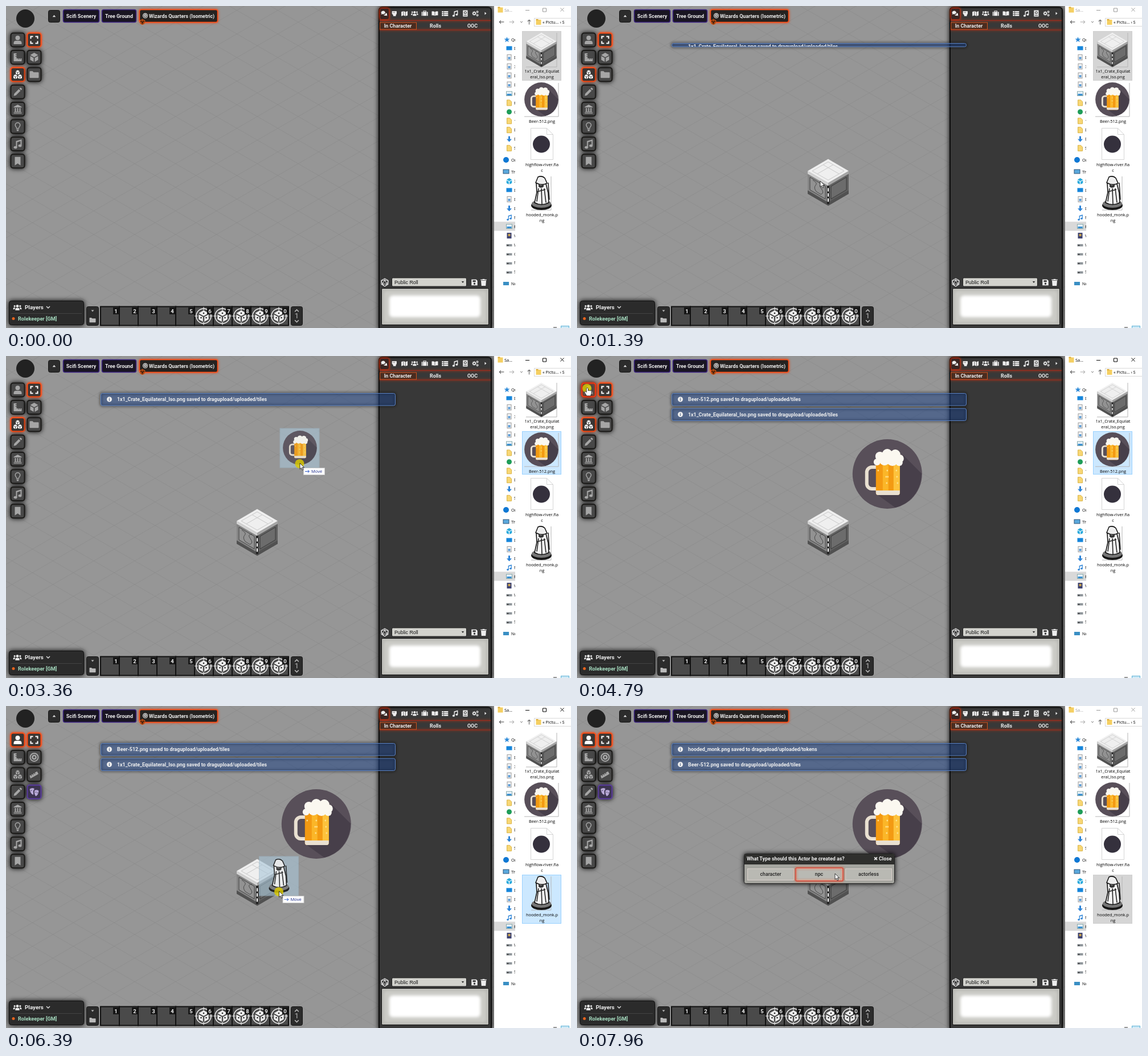
An HTML page that plays this animation: 992x565 px, repeating every 8000 ms.

```html
<!DOCTYPE html>
<html lang="en">
<head>
<meta charset="utf-8">
<title>Drag and drop upload</title>
<style>
  html, body { margin: 0; width: 100%; height: 100%; overflow: hidden; background: #969696; }
  svg { display: block; }
  text { font: 700 8.85px Roboto, sans-serif; fill: #eee; }
  .win text { font: 7.4px "Open Sans", sans-serif; fill: #000; }
  .shade { filter: drop-shadow(0 0 4px #000); }
  .glow { filter: drop-shadow(0 0 2px #ff3a00); }
  .mid { text-anchor: middle; }
</style>
</head>
<body>
<svg id="stage" width="992" height="565"></svg>
<script>
const disc = (r, x = 0, y = 0) =>
  `M${x - r} ${y}a${r} ${r} 0 1 0 ${2 * r} 0a${r} ${r} 0 1 0 ${-2 * r} 0z`;
const box = (x, y, w, h) => `M${x} ${y}h${w}v${h}h${-w}z`;
const cube = (x, y, r) => {
  const w = r * .87, s = r * .75, q = r * .43;
  return `M${x} ${y - r}l${w} ${r / 2}l${-w} ${r / 2}l${-w} ${-r / 2}z` +
    `M${x - w} ${y - r * .28}l${s} ${q}v${r * .85}l${-s} ${-q}z` +
    `M${x + w} ${y - r * .28}l${-s} ${q}v${r * .85}l${s} ${-q}z`;
};
const gear = (x, y, r) => {
  let d = '';
  for (let i = 0; i < 32; i++) {
    const k = i % 4 < 2 ? r : r * .72, a = i * Math.PI / 16;
    d += `${i ? 'L' : 'M'}${x + k * Math.cos(a)} ${y + k * Math.sin(a)}`;
  }
  return d + 'z' + disc(r * .35, x, y);
};

// Icon outlines in a 16 unit box centred on 0,0
const icons = {
  user: disc(4, 0, -3.5) + 'M-7 7.5v-2q0-4 4-4h6q4 0 4 4v2z',
  corner: 'M-7-7h5v2h-2v1h2v2h-2v1h2v3h3v2h1v-2h2v2h1v-2h2v5h-14z',
  cubes: cube(0, -3.8, 4) + cube(-4, 3.6, 4) + cube(4, 3.6, 4),
  cube: cube(0, 0, 8),
  pencil: 'M-7 7l1-4l8-8l3 3l-8 8zM3-6l1-1q1-1 2 0l1 1q1 1 0 2l-1 1z',
  bank: 'M0-8l7 4v1h-14v-1z' + [-5, -1, 3].map(x => box(x, -2, 2, 6)).join('') + box(-6, 4, 12, 1) + box(-7, 6, 14, 1.5),
  bulb: 'M0-7.5a5 5 0 0 1 5 5q0 2-2 4l-.6 2.5h-4.8l-.6-2.5q-2-2-2-4a5 5 0 0 1 5-5zM0-6a3.5 3.5 0 0 0-3.5 3.5q0 1.5 1.5 3l.5 2h3l.5-2q1.5-1.5 1.5-3a3.5 3.5 0 0 0-3.5-3.5zM-2 5h4v1l-1 2h-2l-1-2z',
  music: 'M-3-5l10-3v11a3 2.3 0 1 1-2-2v-6l-6 2v9a3 2.3 0 1 1-2-2z',
  mark: 'M-5-7.5h10v15l-5-3.5l-5 3.5z',
  expand: 'M-7-7h5v2h-3v3h-2zM7-7v5h-2v-3h-3v-2zM-7 7v-5h2v3h3v2zM7 7h-5v-2h3v-3h2z',
  folder: 'M-8-5q0-1 1-1h4l2 2h8q1 0 1 1v8q0 1-1 1h-14q-1 0-1-1z',
  target: disc(8) + disc(6) + disc(4.4) + disc(1.8),
  ruler: 'M-8 2l2-1l1 2l1-.6l-1-2l2-1.2l1 2l1-.6l-1-2l2-1.2l1 2l1-.6l-1-2l4-2.3l2.5 4.5l-14 8z',
  masks: 'M-8-5q4-3 8-1v2q-2 1-1.5 5q.5 3 0 4q-5-1-6.5-10zM.5-2.5q4-2 7.5.5q-.5 7-5 9.5q-3.5-3-2.5-10z' + box(-6, -3, 2, 1) + box(2, 0, 1.6, 1) + box(5, 1, 1.6, 1),
  chat: 'M-2.5-6.5a5.5 4.2 0 1 1-2 8.2l-3.5 1.3l1.2-2.7a5.5 4.2 0 0 1 4.3-6.8zM4-1.5a5 4 0 0 1 3 5.5l1 2.5l-3-1a6 4 0 0 1-7-1.8q6 .3 6-5.2z',
  fist: 'M-5-6h10q1 0 1 1v6l-2 3v3h-7v-3l-3-3v-6q0-1 1-1zM-3-4v3h1v-3zM0-4v3h1v-3z',
  map: 'M-8-4l5-2v11l-5 2zM-2-6l4 2v11l-4-2zM3-4l5-2v11l-5 2z',
  users: disc(3, 0, -3) + disc(2, -6, -3) + disc(2, 6, -3) + 'M-4.5 6v-2q0-3 3-3h3q3 0 3 3v2zM-9 4v-2q0-2 2-2h1.5q1 0 1 .5q-1.500 1-1.500 3.500zM9 4v-2q0-2-2-2h-1.500q-1 0-1 .5q1.500 1 1.500 3.500z',
  bag: 'M-8-4h4v-3h8v3h4v10h-16zM-2.500-4h5v-1.500h-5z' + box(-5.5, -4, 1, 10) + box(4.5, -4, 1, 10),
  book: 'M-8-5q4-1 7.500 1v10q-4-2-7.500-1zM8-5q-4-1-7.500 1v10q4-2 7.500-1z',
  list: [-6, -1.5, 3].map(y => box(-8, y, 4, 3.4) + box(-3, y, 11, 3.4)).join(''),
  atlas: box(-6, -8, 12, 16) + disc(3.6, 0, -2) + disc(2, 0, -2) + box(-4, 4, 8, 1.5),
  cogs: gear(-3, 0, 5.5) + gear(5, -4, 3.2) + gear(5, 4.5, 3.2),
  save: 'M-7-7h11l3 3v11h-14zM-4-5v4h7v-4z' + disc(2.3, 0, 3),
  trash: 'M-7-7h4l1-1h4l1 1h4v2h-14zM-6-4h12l-1 12h-10z',
  up: 'M-5 3l5-6l5 6z', down: 'M-5-3l5 6l5-6z', right: 'M-3-5l6 5l-6 5z',
  angleUp: 'M-7 3l7-7l7 7l-2 2l-5-5l-5 5z', angleDown: 'M-7-3l7 7l7-7l-2-2l-5 5l-5-5z',
  info: disc(8) + box(-1.2, -1, 2.4, 5.5) + box(-1.2, -4.5, 2.4, 2.4),
  close: 'M-7-4l3-3l4 4l4-4l3 3l-4 4l4 4l-3 3l-4-4l-4 4l-3-3l4-4z',
  left: 'M-7 0l5-5l1 1l-3.300 3.300h11.300v1.400h-11.300l3.300 3.300l-1 1z',
  star: 'M0-8l2 5.500h6l-4.600 3.700l1.600 5.800l-5-3.300l-5 3.300l1.600-5.800l-4.600-3.700h6z'
};

const rect = (x, y, w, h, fill, stroke = 'none', more = '') =>
  `<rect x="${x}" y="${y}" width="${w}" height="${h}" fill="${fill}" stroke="${stroke}" ${more}/>`;
const text = (x, y, s, style = '', more = '') => `<text x="${x}" y="${y}" style="${style}" ${more}>${s}</text>`;
const path = (d, fill, stroke = 'none', more = '') => `<path d="${d}" fill="${fill}" stroke="${stroke}" ${more}/>`;
const circle = (x, y, r, fill, more = '') => `<circle cx="${x}" cy="${y}" r="${r}" fill="${fill}" ${more}/>`;
const icon = (name, x, y, size, fill, turn = 0) =>
  path(icons[name], fill, 'none', `fill-rule="evenodd" transform="translate(${x} ${y}) scale(${size / 16}) rotate(${turn})"`);
const group = (id, body, more = '') => `<g id="${id}" ${more}>${body}</g>`;
const use = (id, x, y, k = 1) => `<use href="#${id}" transform="translate(${x} ${y}) scale(${k})"/>`;

function defs() {
  const crate = path('M-36-20L0 1V41L-36 20z', '#848484') + path('M36-20L0 1V41L36 20z', '#606060') +
    path('M-32-9L-5 7V29L-32 13z', '#929292', '#444') + path('M32-9L5 7V29L32 13z', '#6c6c6c', '#3a3a3a') +
    path('M-27-4q9 5 5 9t1 11l8 5q7-2 1-10t3-8', 'none', '#4a4a4a') +
    path('M-36 14L0 35L36 14V20L0 41L-36 20z', '#515151') +
    path('M0-41L36-20L0 1L-36-20z', '#efefef') + path('M-36-20L0 1v5L-36-15z', '#d2d2d2') + path('M36-20L0 1v5L36-15z', '#a5a5a5') +
    path('M0-36L28-20L0-4L-28-20zM-9-31L19-15M9-31L-19-15', 'none', '#c9c9c9') +
    path('M0 6V38', 'none', '#222', 'stroke-width="4"') + path('M0 10V36', 'none', '#fff', 'stroke-width="2" stroke-dasharray="6 3"');
  const foam = [[-18, -21, 6], [-13, -31, 8], [0, -35, 9], [14, -34, 9], [22, -27, 7], [21, -20, 6], [-5, -24, 9], [9, -24, 10]];
  const beer = circle(0, 0, 61, '#584f59') +
    path('M28-33L60-1A61 61 0 0 1 14 59L-18 36z', '#473f4a') +
    rect(-36, -12, 26, 38, 'none', '#e9e0d1', 'rx="9" stroke-width="6"') +
    rect(-20, -24, 42, 61, '#f39a12', 'none', 'rx="4"') + rect(-8, -20, 10, 50, '#fbb628') + rect(11, -20, 11, 50, '#fdc23c') +
    [0, 1, 2, 3, 4, 5, 6, 7].map(i => circle(-16 + i * 17 % 35, -6 + i * 11 % 33, 1.4, '#fee08a')).join('') +
    path('M-20 29h42v4q0 4-4 4h-34q-4 0-4-4z', '#e9e0d1') +
    foam.map(c => circle(...c, '#fbf8f0')).join('');
  const monk = '<ellipse cy="22" rx="18" ry="8" fill="#161616"/><ellipse cy="19" rx="17" ry="7" fill="#777"/>' +
    path('M-9-17Q0-25 8-16L12 0L13 17Q0 24-12 17L-8-1z', '#f4f4f4', '#111', 'stroke-width="1.600"') +
    path('M-10-18L-6-28Q1-31 6-26L10-17Q0-12-10-18z', '#eee', '#111', 'stroke-width="1.500"') +
    path('M-5-16q5 5 9 0v5q-5 4-9 0z', '#333') +
    path('M-5-8L-8 15M0-8L1 20M5-8L8 17M-8-2L7-6M12-18L14 12', 'none', '#222', 'stroke-width="1.600"');
  const die = circle(0, 0, 13, 'none', 'stroke="#eee" stroke-width="1.500"') +
    path('M0-16v6M0 10v6M-16 0h6M10 0h6', 'none', '#eee') + icon('cube', 0, 0, 20, '#eee') +
    circle(0, -5, 1.3, '#222') + circle(-4.5, 3, 1.3, '#222') + circle(4.5, 3, 1.3, '#222');
  const d20 = path('M0-7L6-3.500V3.500L0 7L-6 3.500V-3.500zM0-4L4 3H-4zM0-7V-4M6-3.500L0-4L-6-3.500L-4 3L-6 3.500M6-3.500L4 3L6 3.500M-4 3L0 7L4 3', 'none', 'currentColor');
  return '<defs>' + Object.entries({ crate, beer, monk, die, d20 }).map(([id, body]) => group(id, body)).join('') + '</defs>';
}

function scene() {
  let grid = '';
  for (let y = -270; y < 1100; y += 41.4)
    grid += `M0 ${y - 246}l860 496M0 ${y + 263}l860 -496`;
  return rect(0, 0, 992, 565, '#969696') + path(grid, 'none', '#858585', 'stroke-opacity=".6" stroke-width=".8"') +
    group('crateTile', use('crate', 441, 309.5)) + group('beerTile', use('beer', 544.8, 207)) +
    path('M441 248L549 310L441 373L333 310z', 'none', '#ff9829', 'id="crateHover" stroke-width="2"') +
    path('M545 111L712 207L545 303L378 207z', 'none', '#ff9829', 'id="beerHover" stroke-width="2"');
}

function control(col, row, name, state) {
  const x = 20.5 + 29 * col, y = 59.5 + 30.4 * row;
  const [border, fill, ink] = { on: ['#ff4d14', '#3a3634', '#fff'], purple: ['#5a3ba0', '#3c3450', '#b9aad8'] }[state] || ['#1b1a18', '#484848', '#a6a6a6'];
  return `<g class="${state == 'on' ? 'glow' : 'shade'}">` + rect(x - 12, y - 12, 24, 24, fill, border, 'rx="4" stroke-width="2"') + '</g>' +
    icon(name, x, y, 16, ink);
}
const layer = (id, active, tools) => group(id,
  ['user', 'corner', 'cubes', 'pencil', 'bank', 'bulb', 'music', 'mark'].map((n, i) => control(0, i, n, n == active ? 'on' : '')).join('') +
  tools.map(([n, s], i) => control(1, i, n, s)).join(''));

function topBar() {
  const tab = (x, w, label, border) => rect(x, 6.5, w, 22, '#191522', border, 'rx="3" stroke-width="1.500"') + text(x + w / 2, 20.5, label, '', 'class="mid"');
  return circle(34, 22, 16, '#222') +
    rect(74.5, 7.5, 20, 21, '#2c2c2c', '#151515', 'rx="3"') + icon('up', 84.5, 17.5, 9, '#ddd') +
    tab(100.5, 63, 'Scifi Scenery', '#3c2482') + tab(168.500, 60, 'Tree Ground', '#3c2482') +
    `<g class="glow">${rect(234.500, 6.500, 137, 22, '#252220', '#ff4d14', 'rx="3" stroke-width="1.500"')}</g>` +
    icon('target', 244.500, 17, 9, '#eee') + text(251, 20.5, 'Wizards Quarters (Isometric)') +
    `<g color="#ff6a1a">${circle(239.500, 28, 4.500, '#2a1208') + use('d20', 239.500, 28, .7)}</g>`;
}

function bottomBar() {
  let s = `<g class="shade">${rect(5.500, 517.500, 131, 42, '#2b2b2b', '#111', 'rx="4"')}</g>` +
    icon('users', 20, 529, 13, '#eee') + text(33, 532, 'Players', 'font-size:9.800px') + icon('angleDown', 74, 529, 8, '#ddd') +
    path('M9 539.500h124', 'none', '#444') + circle(13, 548.500, 2.500, '#e8641e') + text(21, 551.500, 'Rolekeeper [GM]', 'fill:#a6dcc0;font-size:9.200px') +
    rect(141.500, 527.500, 21, 33, '#2c2c2c', '#151515', 'rx="3"') + icon('down', 152, 535, 8, '#bbb') + icon('folder', 152, 551, 11, '#bbb') +
    rect(500.500, 527.500, 20, 33, '#2c2c2c', '#151515', 'rx="3"') + icon('angleUp', 510.500, 534, 9, '#bbb') + icon('angleDown', 510.500, 553.500, 9, '#bbb') +
    text(510.500, 548, '1', 'font-size:13px;fill:#bbb;font-weight:400', 'class="mid"');
  for (let i = 0; i < 10; i++) {
    const x = 166 + 33 * i;
    s += rect(x, 527.500, 33, 33, '#4a4a4a', '#111', 'stroke-width="2"');
    if (i > 4) s += use('die', x + 16, 544);
    s += rect(x + 22, 529, 10, 12, '#171717') + text(x + 27, 538.800, (i + 1) % 10, 'font-size:9.500px', 'class="mid"');
  }
  return s;
}

function sidebar() {
  const names = ['chat', 'fist', 'map', 'users', 'bag', 'book', 'list', 'music', 'atlas', 'cogs', 'right'];
  return `<g class="shade">${rect(655, 2.500, 197, 566, '#383838', '#0d0d0d', 'rx="5" stroke-width="2"')}</g>` +
    `<g class="glow">${rect(656.500, 4, 16, 19.500, '#3a2522', '#a02818', 'rx="3"') + path('M656 25.500h195M656 42h195', 'none', '#a5281a')}</g>` +
    rect(656.500, 29, 64, 12, '#4a2c20', '#d0541e') +
    names.map((n, i) => icon(n, 664 + 17.800 * i, 13, i > 9 ? 8 : 11, '#eee')).join('') +
    text(688, 38, 'In Character', '', 'class="mid"') + text(754, 38, 'Rolls', '', 'class="mid"') + text(819, 38, 'OOC', '', 'class="mid"') +
    `<g color="#eee">${use('d20', 665, 485)}</g>` +
    rect(677.500, 477, 131, 15, '#d3d3ce', '#222', 'rx="2"') +
    text(682, 488, 'Public Roll', 'font:8.800px Liberation Sans,sans-serif;fill:#111') + icon('down', 802, 484.500, 7, '#111') +
    icon('save', 822.500, 485, 12, '#eee') + icon('trash', 838.500, 485, 12, '#eee') +
    rect(659.500, 495.500, 188, 64, '#bdbdb8', '#111', 'rx="2"') +
    rect(664, 500, 179, 55, '#cbcbc6', 'none', 'rx="6" style="filter:blur(2px)"') +
    rect(673, 508, 160, 38, '#fff', 'none', 'rx="6" style="filter:blur(2.500px)"');
}

function treeRow(kind, y, label) {
  const x = 883.500, page = c => rect(x - 3.500, y - 5, 7, 9.500, '#f6f6f6', '#999') + rect(x - 2, y - 1, 4, 4, c);
  const art = {
    m: () => rect(x - 5, y - 4, 10, 7, '#1686dc'), d: () => page('#5b9bd5'),
    p: () => rect(x - 5, y - 4, 10, 7.500, '#e8f2fa', '#8aa') + rect(x - 4, y, 8, 3, '#3b8fd0'),
    f: () => path(`M${x - 4} ${y - 5}h5l3 3v7h-8z`, '#f8d775', '#d9b44a'),
    g: () => circle(x, y, 4.500, '#1f9d58'),
    a: () => path(`M${x - 1.500} ${y - 5}h3v5h3l-4.500 5l-4.500-5h3z`, '#2d84d8'),
    c: () => icon('cube', x, y, 11, '#29a9dc'), n: () => icon('music', x, y, 10, '#2d84d8'),
    v: () => rect(x - 4, y - 5, 8, 10, '#3d4270') + rect(x - 2, y - 3, 4, 4, '#c9a24c'),
    w: () => rect(x - 5, y - 1, 10, 4, '#8d9499') + rect(x - 4, y + .500, 3, 1.500, '#333')
  }[kind]();
  return art + text(892, y + 2.800, label);
}
function explorer() {
  const fill = (kinds, letters, top) => [...kinds].map((k, i) => treeRow(k, top + i * 15.900, letters[i])).join('');
  const label = (y, ...lines) => lines.map((s, i) => text(941, y + 9.800 * i, s, '', 'class="mid"')).join('');
  const frame = (x, y, w, h) => path(`M${x + w} ${y}v${h}h${-w}`, 'none', '#b5b5b5');
  const folder = (x, y) => rect(x - 4.500, y - 4, 9, 9, '#f5cf62') + rect(x - 4.500, y - 5, 4, 2, '#d9a938');
  const ink = 'fill:currentColor';
  return rect(857, 0, 135, 565, '#fff') + folder(868, 6.500) +
    group('winTitle', text(875, 10, 'Sa...', ink) + path('M912 7.500h7M942.500 4h6v6h-6zM973.500 3.500l6 6m0-6l-6 6', 'none', 'currentColor')) +
    icon('left', 870, 28, 10, '#444') + icon('left', 888, 28, 10, '#aaa', 180) + path('M903 27l2 2l2-2', 'none', '#777') + icon('left', 918.500, 28, 10, '#444', 90) +
    rect(927.500, 21.500, 70, 14, '#fff', '#d9d9d9') + folder(935, 28) + text(942, 31, '« Pictu... › S') +
    rect(857, 378.500, 37, 16, '#d9d9d9') +
    `<svg width="894" height="565">${icon('star', 879.500, 59, 10, '#2d8ad8') + text(887, 61.500, 'Quick') +
      fill('mddddpfgffaf', 'DD3DDPPG1DDS', 74.500) + circle(878, 270, 5, '#0f78d4') + text(887, 273, 'One') +
      rect(873, 287, 10, 7, '#5aa9dd', '#357') + text(887, 294, 'This') + fill('cmdanpvwwww', '3DDDNPVWGNS', 307.500) +
      rect(873, 484, 10, 6, '#3a8fc4') + text(887, 489.500, 'Net')}</svg>` +
    rect(906.500, 44.500, 68, 86, 'none', 'none', 'id="selCrate"') +
    rect(906.500, 132.500, 68, 75, 'none', 'none', 'id="selBeer"') +
    rect(906.500, 296.500, 68, 85, 'none', 'none', 'id="selMonk"') +
    frame(913, 47, 54, 60) + use('crate', 940, 77, .74) + label(117, '1x1_Crate_Equilat', 'eral_Iso.png') +
    frame(910, 135, 60, 59) + use('beer', 940, 164, .49) + label(204.500, 'Beer-512.png') +
    path('M921.500 214.500h28l11 11v44h-39zM949.500 214.500v11h11', '#fff', '#d5d5d5') + circle(940, 242.500, 15, '#35313d') + label(281, 'highflow-river.fla', 'c') +
    frame(922, 299, 35, 59) + use('monk', 940, 328) + label(369, 'hooded_monk.p', 'ng') +
    rect(961, 563, 6, 2, '#999') + rect(974.500, 561.500, 14, 8, '#cce8f5', '#5fb3d8');
}

function dialog() {
  const button = (x, label, id) => rect(x + .500, 285.500, 81, 20, '#b9b9b3', '#d9cfca') +
    text(x + 41, 298.300, label, 'font-weight:500;fill:#222;font-size:8.700px', 'class="mid"') +
    rect(x, 284, 83, 23, 'none', '#d8483a', `id="${id}" rx="2" stroke-width="1.500" class="glow"`);
  return group('dialog', `<g class="shade">${rect(293.500, 259.500, 264, 52, '#a5a59f', '#222', 'rx="3"')}</g>` +
    rect(294, 260, 263, 18, '#2f2f2d') + text(298, 271, 'What Type should this Actor be created as?') +
    icon('close', 524.500, 267.700, 7, '#eee') + text(530, 271, 'Close') +
    button(299, 'character', 'overFirst') + button(384, 'npc', 'overNpc') + button(471, 'actorless', 'overLast'));
}

const saved = (name, folder, start, end) => ({ label: `${name} saved to dragupload/uploaded/${folder}`, start, end });
const notes = [
  saved('hooded_monk.png', 'tokens', 6560, 9e9),
  saved('Beer-512.png', 'tiles', 3640, 9e9),
  saved('1x1_Crate_Equilateral_Iso.png', 'tiles', 1340, 6450)
];
const noteMarkup = notes.map((n, i) => group('note' + i,
  rect(166.500, .500, 517, 22, 'none', '#000', 'rx="3" stroke-width="4" opacity=".45" style="filter:blur(2px)"') +
  rect(166.500, .500, 517, 22, 'rgba(30,66,130,.54)', '#5d84c4', 'rx="3"') +
  `<svg width="690" height="22">${icon('info', 181.500, 11, 9, '#eee') + text(195, 14, n.label)}</svg>`)).join('');

const cursor = group('cursor',
  group('ghost', rect(-35, -61, 69, 69, '#a9c6d8', '#9cb6c6', 'opacity=".6"') +
    ['crate', 'beer', 'monk'].map(n => group('ghost-' + n, use(n, 0, -27, { crate: .74, beer: .49, monk: 1 }[n]), 'opacity=".9"')).join('')) +
  circle(-.500, 1, 8, '#dcca00', 'id="press" opacity=".82"') +
  group('move', rect(6.500, 8.500, 37, 12, '#fff', '#c8c8c8') + icon('left', 13, 14.500, 9, '#2a55c8', 180) + text(20, 17.300, 'Move', 'fill:#1c2c8c;font-size:7.600px'), 'class="win"') +
  path('M0 0v10.500l2.400-2.300l1.700 4l1.800-.8l-1.700-3.800h3.300z', '#fff', '#111', 'id="arrow" stroke-width=".8"') +
  path('M0 0c-1.500 0-1.500 1-1.500 1.500v6l-2-1.500c-1.200 0-1.800 1-1 2l3.500 6h7l1.500-5v-3.500c0-1.200-1.800-1.200-2-.2c0-1.200-1.800-1.200-2-.2c0-1.200-2-1.200-2-.2v-3.400c0-1.500-1.500-1.500-1.500-1.500z', '#fff', '#111', 'id="hand" stroke-width=".8"'));

const stage = document.getElementById('stage');
stage.innerHTML = defs() + scene() + topBar() +
  layer('tileLayer', 'cubes', [['expand', 'on'], ['cube'], ['folder']]) +
  layer('tokenLayer', 'user', [['expand', 'on'], ['target'], ['ruler'], ['masks', 'purple']]) +
  rect(8.500, 47.500, 24, 24, 'none', '#ff3a14', 'id="userHover" rx="4" stroke-width="2" class="glow"') +
  bottomBar() + sidebar() + noteMarkup + dialog() + group('explorer', explorer(), 'class="win"') + cursor;

const el = id => document.getElementById(id);
const show = (id, on) => { el(id).style.display = on ? '' : 'none'; };
const ramp = (t, a, b) => Math.min(1, Math.max(0, (t - a) / (b - a)));
const ease = u => u * u * (3 - 2 * u);
const within = (t, spans) => spans.some(([a, b]) => t >= a && t < b);

// Pointer stops: time, x, y
const route = [
  [30, 800, 580], [430, 942, 104], [540, 942, 104], [830, 738, 200], [1150, 427, 307], [1890, 427, 307],
  [2230, 945, 175], [2480, 945, 178], [3170, 583, 205], [3340, 516, 188], [4000, 516, 188], [4420, 18, 90],
  [4550, 18, 90], [4740, 18, 56], [4900, 18, 56], [5320, 925, 335], [5600, 940, 357], [6120, 940, 352],
  [6540, 293, 314], [6830, 293, 314], [7000, 334, 326], [7300, 490, 296], [7740, 453, 294], [8000, 453, 294]
];
const presses = [[460, 1150], [2420, 3450], [4760, 4870], [5560, 5640], [6050, 6560], [7860, 7930]];
const drags = { crate: [560, 1150], beer: [2500, 3450], monk: [6150, 6560] };

function pointer(t) {
  const i = Math.max(1, route.findIndex(p => p[0] > t));
  const [a, b] = [route[i - 1], route[i]], u = ease(ramp(t, a[0], b[0]));
  return [a[1] + (b[1] - a[1]) * u, a[2] + (b[2] - a[2]) * u];
}
function select(id, state) {
  const [fill, stroke] = { on: ['#cce8ff', '#99d1ff'], idle: ['#d5d5d5', '#cfcfcf'], hover: ['#e5f3ff', '#e5f3ff'] }[state] || ['none', 'none'];
  el(id).setAttribute('fill', fill);
  el(id).setAttribute('stroke', stroke);
}

function draw(t) {
  const [x, y] = pointer(t);
  el('cursor').setAttribute('transform', `translate(${x} ${y})`);
  const hand = x < 62 && y < 285;
  show('hand', hand);
  show('arrow', !hand);
  show('press', within(t, presses));
  const dragging = within(t, Object.values(drags));
  show('ghost', dragging);
  show('move', dragging);
  for (const n in drags) show('ghost-' + n, within(t, [drags[n]]));

  show('crateTile', t >= 1270);
  show('beerTile', t >= 3580);
  show('crateHover', t >= 1670 && t < 1950);
  show('beerHover', t >= 3880 && t < 4090);

  const tokens = t >= 4870;
  show('tileLayer', !tokens);
  show('tokenLayer', tokens);
  show('userHover', t >= 4640 && t < 4960);

  const active = within(t, [[2420, 4870], [5560, 7870]]);
  el('winTitle').style.color = active ? '#000' : '#999';
  select('selCrate', t < 2420 ? 'idle' : '');
  select('selBeer', t < 2180 || t >= 5560 ? '' : t < 2420 ? 'hover' : active ? 'on' : 'idle');
  select('selMonk', t < 5310 ? '' : t < 5560 ? 'hover' : active ? 'on' : 'idle');

  let top = 65;
  notes.forEach((n, i) => {
    const u = ease(ramp(t, n.start, n.start + 140)), h = Math.max(3, 22 * u - .500);
    const g = el('note' + i), clip = g.querySelector('svg');
    show('note' + i, u > 0 && t < n.end + 250);
    g.setAttribute('transform', `translate(0 ${top})`);
    g.setAttribute('opacity', 1 - ramp(t, n.end, n.end + 250));
    g.querySelectorAll('rect').forEach(r => r.setAttribute('height', h));
    clip.setAttribute('height', h);
    clip.querySelector('text').setAttribute('y', 7 + 7 * u);
    top += 26.500 * u;
  });

  el('dialog').setAttribute('opacity', ramp(t, 6700, 6900));
  show('dialog', t >= 6700);
  const over = (a, b) => t > 7000 && y < 307 && x >= a && x < b;
  show('overFirst', over(299, 382));
  show('overNpc', over(384, 467));
  show('overLast', over(471, 554));
}

function tick() {
  draw(performance.now() % 8000);
  requestAnimationFrame(tick);
}
tick();
</script>
</body>
</html>
```
